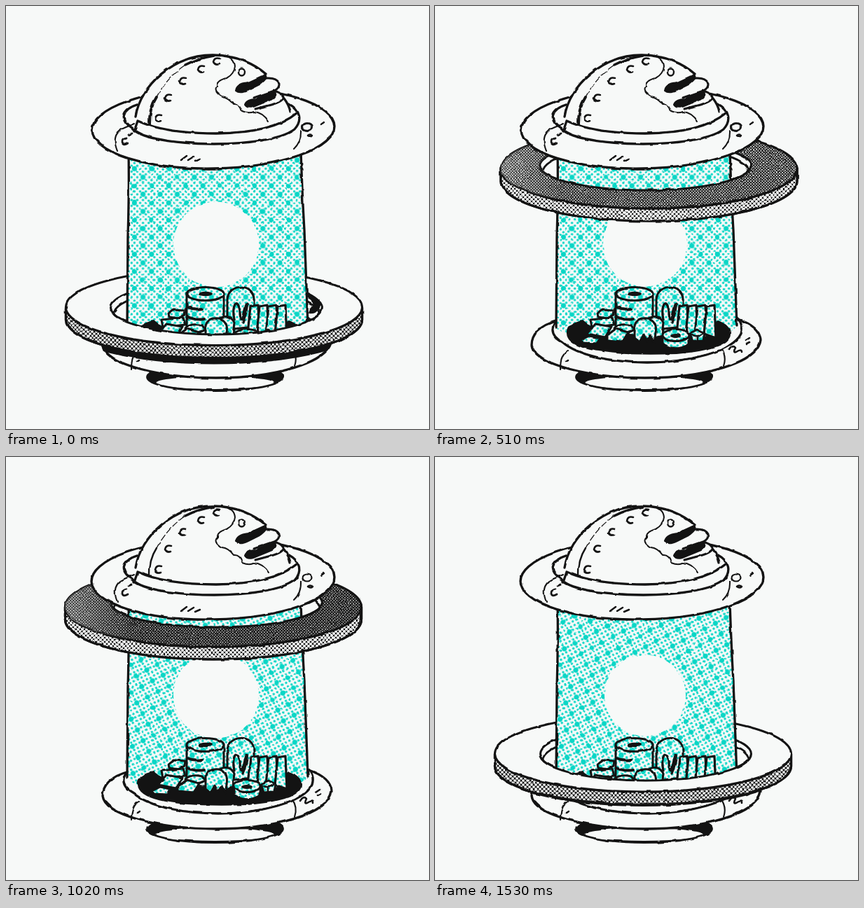
Recreate the animation shown at these times as an HTML page. Size 604 by 604 pixels, loop 1.7 s.

```html
<!DOCTYPE html>
<html lang="en">
<head>
<meta charset="utf-8">
<title>Planet in a jar</title>
<style>
html, body { margin: 0; width: 100%; height: 100%; overflow: hidden; background: #f7f9f8; }
svg { display: block; width: 100vw; height: 100vh; }
</style>
</head>
<body>
<svg id="stage" viewBox="0 0 604 604"></svg>
<script>
const PAPER = '#f7f9f8', INK = '#131313', TEAL = '#0ad6c6';
const STEP_MS = 170;

// Ring poses: centre x and y, hole centre y, shadow depth, dot size on a shaded face
const POSES = [
  { x: 297, y: 430, hole: 431, shadow: 10 },
  { x: 297, y: 423.5, hole: 424, shadow: 4 },
  { x: 297, y: 402, hole: 403, shadow: 0 },
  { x: 305.5, y: 232, hole: 228, shadow: 0, dark: 0.95 },
  { x: 296, y: 214, hole: 208, shadow: 0, dark: 0.75 },
  { x: 296, y: 208, hole: 202, shadow: 0, dark: 0.75 }
];
// Hand-drawn takes: wobble seed, halftone angle, brim shift, foot drop
const TAKES = {
  a: { seed: 3, angle: 0, brim: 0, foot: 0 },
  b: { seed: 11, angle: 17, brim: 2, foot: 3 },
  c: { seed: 23, angle: 17, brim: -1, foot: 1 }
};
// Pose, take and radius of the glow at each step
const STEPS = [
  [0, 'a', 61], [1, 'c', 58], [2, 'b', 57], [3, 'a', 60], [4, 'c', 61],
  [5, 'b', 58], [4, 'c', 61], [3, 'a', 60], [2, 'b', 57], [1, 'c', 58]
];

const path = (d, fill = 'none', width = 3.3, extra = '') =>
  `<path d="${d}" fill="${fill}" stroke="${INK}" stroke-width="${width}" ${extra}/>`;
const solid = (d, fill, extra = '') => `<path d="${d}" fill="${fill}" ${extra}/>`;
const oval = (cx, cy, rx, ry) =>
  `M${cx - rx} ${cy}a${rx} ${ry} 0 1 0 ${2 * rx} 0a${rx} ${ry} 0 1 0 ${-2 * rx} 0z`;
const clip = (id, d) => `<clipPath id="${id}"><path d="${d}"/></clipPath>`;

// Diagonal dot screen with n cells per tile; radius(i, j) in half cells
function screen(id, cell, n, back, front, angle, radius) {
  const size = cell * n;
  let dots = '';
  for (let i = 0; i <= 2 * n; i++) {
    for (let j = i % 2; j <= 2 * n; j += 2) {
      dots += `<circle cx="${i * cell / 2}" cy="${j * cell / 2}" r="${radius(i, j)}"/>`;
    }
  }
  return `<pattern id="${id}" width="${size}" height="${size}" patternUnits="userSpaceOnUse"
    patternTransform="rotate(${angle})"><rect width="${size}" height="${size}" fill="${back}"/>
    <g fill="${front}">${dots}</g></pattern>`;
}

const BASE = 'M176 449C148 456 138 470 138 484C141 512 222 531 300 531C382 531 461 510 465 477C464 462 450 453 432 447';
const BEAM = 'M175 205H421L426 320L431 456Q420 478 303 480Q184 478 173 458L174 320Z';

function defs(take, pose) {
  const big = (i, j) => (i % 6 === 0 && j % 6 === 0) || (i === 3 && j === 3);
  return `<defs>
    <filter id="wobble" x="0" y="0" width="604" height="604" filterUnits="userSpaceOnUse" color-interpolation-filters="sRGB">
      <feTurbulence type="fractalNoise" baseFrequency=".07" numOctaves="2" seed="${take.seed}"/>
      <feDisplacementMap in="SourceGraphic" scale="3" xChannelSelector="R" yChannelSelector="G"/>
    </filter>
    ${screen('teal', 8.15, 3, PAPER, TEAL, take.angle, (i, j) => big(i, j) ? 3.6 : 1.75)}
    ${screen('rim', 6, 1, INK, PAPER, 0, () => pose.dark ? 2 : 1.85)}
    ${screen('face', 4.1, 1, INK, PAPER, 0, () => pose.dark || 0)}
    ${screen('pale', 4.1, 1, INK, PAPER, 0, () => 1.4)}
    <linearGradient id="fade"><stop stop-color="#fff"/><stop offset=".3" stop-color="#000"/></linearGradient>
    <mask id="left"><rect width="604" height="604" fill="url(#fade)"/></mask>
    ${clip('base', BASE + 'Z')}
    ${clip('front', `M0 ${pose.hole}H604V604H0Z`)}
    ${clip('hole', oval(300.5, pose.hole, 151, pose.dark ? 35 : 38))}
  </defs>`;
}

const crescent = (x, y, rx, ry, depth) =>
  `M${x - rx} ${y}A${rx} ${ry} 0 0 0 ${x + rx} ${y}v${depth}A${rx} ${ry} 0 0 1 ${x - rx} ${y + depth}Z`;

function ring({ x, y, hole, dark }) {
  const rx = 211.5, ry = dark ? 57 : 54.5;
  const opening = oval(300.5, hole, 151, dark ? 35 : 38);
  const face = oval(x, y, rx, ry) + opening;
  const rule = 'fill-rule="evenodd"';
  return path(crescent(x, y, rx, ry, 18), 'url(#rim)')
    + path(face, dark ? 'url(#face)' : PAPER, 3, rule)
    + (dark ? solid(face, 'url(#pale)', rule + ' mask="url(#left)"') : '');
}

function ringBack(pose, heavy) {
  const wall = path(oval(301, pose.hole + 9, 147, 38), 'none', 2.6, 'clip-path="url(#hole)"');
  const shade = heavy ? solid('M431 409Q457 421 446 435Q442 440 432 439L434 432Q444 424 431 417Z', INK) : '';
  return ring(pose) + wall + shade;
}

function beam(radius) {
  return solid(BEAM, 'url(#teal)')
    + solid(oval(300, 340.5, radius, radius), PAPER)
    + path('M175 206Q176 260 174 330L173 458M421 206Q423 270 426 320L431 456');
}

function base({ foot }) {
  const outline = oval(298.5, 530 + foot, 97, 19.5);
  return solid(outline, INK)
    + solid(oval(298.5, 538 + foot, 84, 9), PAPER)
    + path(outline, 'none', 2.8)
    + path(BASE, PAPER)
    + path('M190 492Q179 498 179 518M408 488Q417 500 412 514', 'none', 2.1)
    + path('M187 508l3-2M420 491q5-8 9-3q-4 8 1 6q8-5 8 0M443 478l6-4M445 483l4-2', 'none', 2.6);
}

function floor() {
  return path('M180 444C164 454 163 470 182 480C205 500 256 509 303 509C362 509 425 493 437 468C440 458 437 450 430 444')
    + solid('M174 450C167 466 181 478 203 490Q250 507 303 507Q366 507 412 488Q434 476 434 455L420 451Q303 424 190 454Z', PAPER);
}

function city() {
  const pit = 'M188 468Q186 454 211 449Q231 469 303 469Q378 469 404 449Q423 456 422 469Q421 490 345 497Q190 502 188 468Z';
  const block = (d, width = 3) => path(d, 'url(#teal)', width);
  const bar = x => block(`M${x - 4} 468L${x} 429L${x + 11} 427L${x + 13} 474Z`, 3.2);
  return solid(pit, INK)
    + block('M316 462V419C317 396 354 395 354 419V458Z')
    + path('M326 448C322 427 330 415 334 435C334 452 338 451 340 438C346 411 346 432 338 452')
    + [349, 362, 375, 388].map(bar).join('')
    + block('M258 411V458Q285 466 311 456V411Z')
    + block(oval(284.5, 411, 26.5, 9.5))
    + solid(oval(285, 411, 10, 3.2), INK)
    + path('M259 430Q268 434 280 432M259 444Q269 449 283 447', 'none', 4)
    + block('M232 439L240 433L256 434L255 441L246 446L233 444Z')
    + block('M222 448L253 445L256 455L224 459Z')
    + block('M217 468L229 454L252 458L243 473Z')
    + block('M256 460Q264 452 280 456L285 462L270 468L257 464Z')
    + block('M246 470L258 461L276 466L268 479L246 477Z')
    + block('M208 477L220 471L235 474L231 482L210 481Z')
    + block('M303 447Q319 438 326 452L324 471L314 474Z')
    + block('M285 474V456Q289 444 304 446Q318 449 315 468L313 480L308 470L303 479L298 469L292 480Z')
    + block('M325 471V482Q342 495 363 483V471Z')
    + block(oval(344, 470, 19, 8.5))
    + solid(oval(344, 471, 8, 3), INK)
    + block('M364 467L375 462L385 467L383 478L368 479Z')
    + path('M367 469Q374 474 382 468M374 471V478', 'none', 2.6);
}

function dome(bold) {
  const crater = ([x, y]) =>
    path(`M${x + 4} ${y - 4}Q${x - 4} ${y - 6} ${x - 5} ${y + 1}Q${x - 2} ${y + 6} ${x + 3} ${y + 4}`, 'none', 2.6);
  return solid('M187 164C190 113 239 70 295 70C330 70 356 84 372 98L398 132L406 151C391 190 222 190 187 164Z', PAPER)
    + path('M185 158C192 113 239 70 295 70C330 70 356 84 371 97M397 132Q404 141 406 151')
    + path('M183 179L188 164Q227 182 300 182Q382 181 415 153')
    + path('M205 169Q204 147 215 130', 'none', bold ? 4 : 2.4)
    + path('M215 130Q231 101 256 84', 'none', 1.3, 'stroke-dasharray="9 4"')
    + path('M256 84Q273 75 297 71')
    + [[218, 160], [232, 131], [253, 107], [279, 90], [301, 79]].map(crater).join('')
    + path(oval(336.5, 94, 4.5, 5.5), 'none', 2.4)
    + path('M312 71Q326 74 327 86Q326 97 315 103Q301 107 302 115Q295 121 308 129Q318 130 325 140Q334 139 337 150Q347 154 354 151Q367 152 375 165', 'none', 2)
    // Two pale fingers, each below a dark slot
    + path('M350 114L372 103Q386 102 390 110Q391 117 383 121L354 131', PAPER, 3)
    + path('M360 132L386 122Q397 126 396 132Q392 137 382 140L356 147', PAPER, 3)
    + path('M328 121Q329 111 346 109L370 98Q375 103 362 112L346 120Q334 126 328 121Z', INK, 2)
    + path('M341 141Q343 133 358 133L384 124Q388 127 380 133L358 142Q345 148 341 141Z', INK, 2)
    + path('M340 112L359 106Q366 104 367 107L351 114Q341 117 340 112Z', INK, 1);
}

function head({ brim }, bold) {
  const rim = 296 + brim * 0.5, width = 173 - brim * 0.5;
  return path(oval(rim, 174.5, width, 57.5), PAPER, 3.4, `transform="rotate(-1 296 174)"`)
    + path('M187 141C165 148 162 163 180 174L185 179C220 202 374 205 412 176C423 164 421 149 404 140', PAPER)
    + dome(bold)
    + path('M159 207Q149 183 169 174L183 168M411 204Q422 194 421 177', 'none', 2)
    + path('M174 196q-7 4-8-1q-1-5 6-6M175 184l5-2', 'none', 2.8)
    + path(oval(430, 172.5, 6.5, 5), 'none', bold ? 3.2 : 2.2)
    + path('M431 185q3-3 7 0q-3 3-7 0M450 169l4-3', 'none', 2.5)
    + path('M250 220l8-6M260 220l8-5M270 221l7-3', 'none', 2.5);
}

function picture(step) {
  const [poseIndex, takeName, glow] = STEPS[step];
  const pose = POSES[poseIndex], take = TAKES[takeName];
  const shadow = pose.shadow
    ? solid(crescent(pose.x, pose.y + 17, 211.5, 54.5, pose.shadow), INK, 'clip-path="url(#base)"') : '';
  return defs(take, pose)
    + `<g filter="url(#wobble)" stroke-linecap="round" stroke-linejoin="round">
      ${ringBack(pose, poseIndex === 0)}
      ${base(take)}${floor()}${beam(glow)}${city()}${shadow}
      <g clip-path="url(#front)">${ring(pose)}</g>
      ${head(take, takeName === 'a')}
    </g>`;
}

const stage = document.getElementById('stage');
let shown = -1;
function tick() {
  const step = Math.floor(performance.now() / STEP_MS) % STEPS.length;
  if (step !== shown) {
    stage.innerHTML = picture(step);
    shown = step;
  }
  requestAnimationFrame(tick);
}
tick();
</script>
</body>
</html>
```
